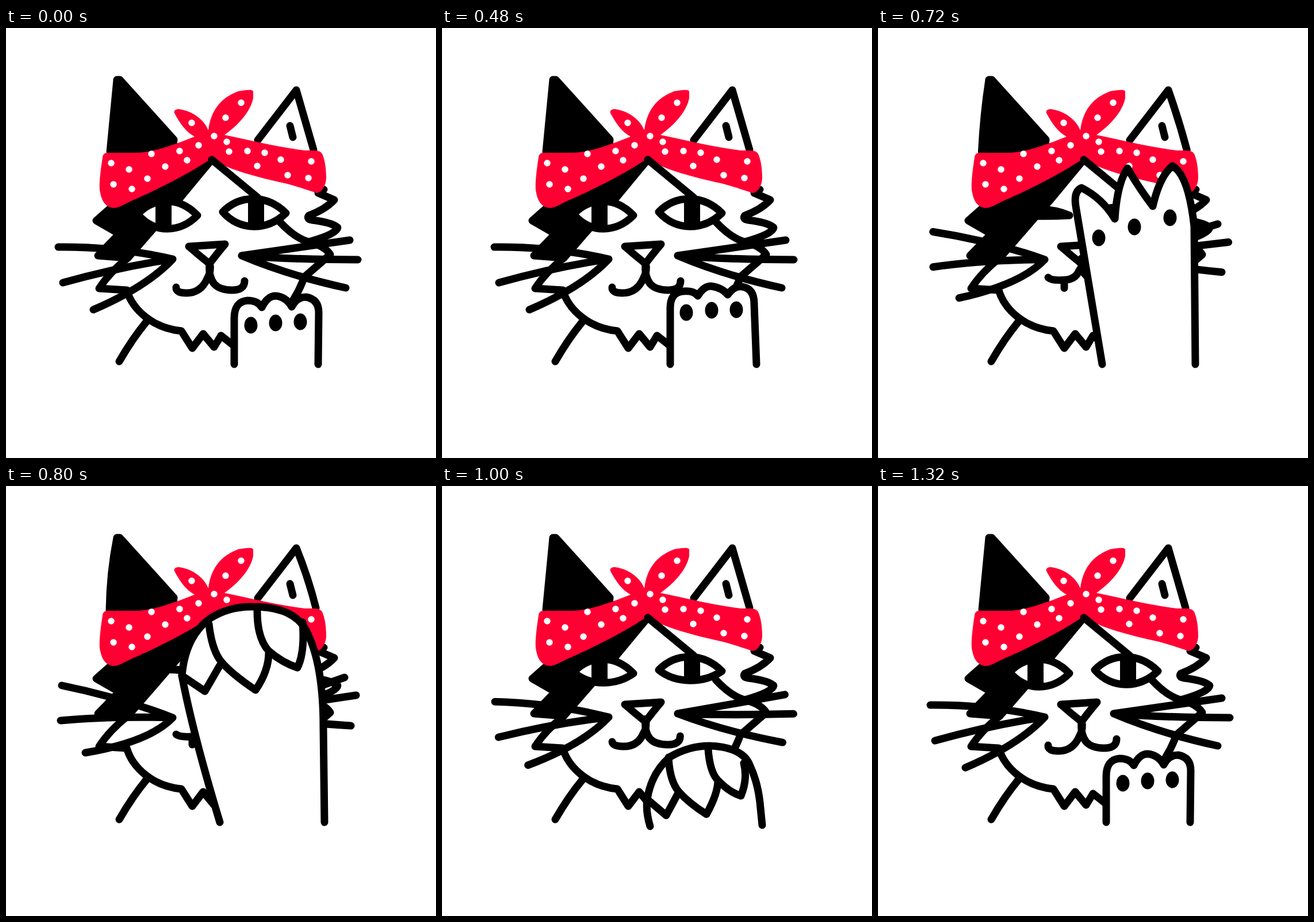
Recreate the animation shown at these times as an HTML page. Size 748x748 px, loop 1.4 s.

```html
<!DOCTYPE html>
<html lang="en">
<head>
<meta charset="utf-8">
<title>Cat washing its face</title>
<style>
html, body { margin: 0; width: 100%; height: 100%; overflow: hidden; background: #fff; }
svg { display: block; width: 100vw; height: 100vh; }
.ink { fill: none; stroke: #000; stroke-width: 13; stroke-linecap: round; stroke-linejoin: round; }
.solid { fill: #000; }
.paper { fill: #fff; }
.pupil { stroke: #000; stroke-width: 28; }
</style>
</head>
<body>
<svg viewBox="0 0 748 748">
  <path id="earL" class="ink solid"/>
  <path id="earR" class="ink"/>
  <path class="ink" d="M494 170L499 190"/>
  <path class="ink solid" d="M357 230L299 300L283 318L212 400L160 396L197 358L157 335L183 312Z"/>
  <g class="ink">
    <path d="M553 281h.01M543 287L571 299Q555 316 527 326Q522 332 532 334Q566 338 577 347Q576 358 527 372"/>
    <path d="M476 337Q505 368 530 373Q555 380 564 394Q540 415 519 433Q505 472 480 498Q450 514 415 527"/>
    <path d="M212 400Q180 425 162 453L210 456C220 490 255 522 305 527L324 557L343 532L362 555L374 535L398 554"/>
    <path d="M245 510Q220 540 197 580"/>
    <path d="M318 380L381 376Q365 395 354 410Q335 395 318 380"/>
  </g>
  <path id="whiskers" class="ink"/>
  <path id="mouth" class="ink"/>
  <path id="white" class="paper"/>
  <path id="pupils" class="pupil"/>
  <path id="lids" class="ink"/>
  <path fill="#ff0033" d="M176 217Q169 217 168 225C164 250 162 270 163 282C166 300 172 311 186 313C196 314 206 306 222 299C268 279 326 249 357 227C378 243 430 258 480 269C500 273 530 284 541 287C550 285 556 275 557 262C557 245 555 230 550 219C546 212 538 213 520 213C470 207 420 194 380 186C400 172 425 148 430 122L430 110C428 106 415 108 404 110C372 122 356 145 352 178C345 160 325 144 300 141Q291 142 293 148C302 165 312 180 328 189C300 200 255 218 222 217Z"/>
  <path id="dots" stroke="#fff" stroke-width="11.5" stroke-linecap="round"/>
  <path class="ink" d="M358 229L438 295"/>
  <path id="paw" class="ink paper"/>
  <path id="toes" class="ink"/>
  <g id="pads"><ellipse rx="11.5" ry="14.5"/><ellipse rx="11.5" ry="14.5"/><ellipse rx="11.5" ry="14.5"/></g>
</svg>
<script>
const LOOP = 1400;
const $ = id => document.getElementById(id);
const draw = (id, d) => $(id).setAttribute('d', d);
const lerp = (a, b, k) => a + (b - a) * k;

// Blend two paths that share the same commands
function mix(a, b, k) {
  const ends = b.match(/[\d.]+/g);
  let i = 0;
  return a.replace(/[\d.]+/g, v => lerp(+v, +ends[i++], k).toFixed(2));
}

const spots = '183 235,214 246,187 272,219 280,246 262,253 219,277 241,302 214,315 230,335 204,362 188,323 165,' +
  '382 156,409 130,384 198,388 215,420 214,450 217,437 240,478 229,490 256,526 261,531 232';
draw('dots', spots.split(',').map(p => `M${p}h.01`).join(''));

// Paw showing its pads
const palm = {
  low: {
    line: 'M397 585L397 505Q397 476 420 474Q438 474 445 486Q455 466 469 466Q488 468 497 485Q505 468 522 468Q544 472 544 495L543 585',
    pads: '426 517 469 513 512 511'
  },
  lift: {
    line: 'M397 585L397 490Q396 460 419 458Q438 456 445 466Q455 449 468 449Q488 452 497 464Q508 448 522 450Q543 453 543 480L547 585',
    pads: '425 495 469 491 512 490'
  },
  claws: {
    line: 'M406 585L376 360Q372 340 385 344Q412 358 432 393Q438 345 450 324Q468 355 491 383Q500 345 521 322Q545 335 550 405L550 585',
    pads: '409 416 464 407 520 396'
  },
  high: {
    line: 'M390 585L344 310Q340 284 354 278Q390 296 412 332Q416 270 434 244Q455 280 478 310Q490 258 512 240Q540 255 550 345L552 585',
    pads: '384 365 446 346 508 330'
  },
  dip: {
    line: 'M406 641L397 580Q398 540 418 531Q438 526 450 547Q462 528 478 528Q495 528 511 546Q518 546 535 538Q546 555 547 575L551 627',
    pads: '425 575 472 572 515 568'
  }
};

// Paw bent forward, toes hanging
const bent = {
  over: {
    line: 'M372 585Q325 430 306 330Q312 260 357 229Q390 209 430 210Q502 210 523 253Q552 310 552 420L554 585',
    toes: 'M306 330L346 357L372 312M353 240Q358 285 374 305Q390 325 434 355Q458 320 457 287M437 218Q437 265 457 287Q480 307 507 316Q520 290 516 237'
  },
  rest: {
    line: 'M362 592Q354 565 357 545Q364 499 397 471Q430 452 465 452Q524 454 536 487Q549 515 553 550L557 590',
    toes: 'M357 545L390 573L412 532M394 472Q396 513 412 532Q430 552 460 571Q480 535 480 512M463 458Q466 498 480 512Q500 533 520 539Q532 510 525 482'
  },
  sink: {
    line: 'M384 617Q372 590 376 566Q382 527 412 501Q440 483 472 482Q526 484 535 515Q546 540 550 572L554 609',
    toes: 'M376 569L406 574L426 550M408 503Q410 538 426 550Q442 566 468 577Q488 550 488 535M470 488Q474 522 488 535Q506 550 522 552Q534 530 528 510'
  }
};
const knuckles = 'M404 547L422 562L448 546M458 545L475 574L499 548M511 546L523 558L535 540M478 498Q506 494 517 535';

const blend = (set, a, b, k) => {
  const out = {};
  for (const key in set[a]) out[key] = mix(set[a][key], set[b][key], k);
  return out;
};

// start, whisker lift, mouth lift, upper lid, lower lid, paw
const steps = [
  [0, 0, 0, 23, 25, palm.low],
  [120, 0, 0, 23, 25, blend(palm, 'low', 'lift', .25)],
  [240, 0, 0, 23, 25, blend(palm, 'low', 'lift', .5)],
  [360, 0, 0, 23, 25, blend(palm, 'low', 'lift', .75)],
  [480, 0, 0, 23, 25, palm.lift],
  [560, .27, .38, 20, 18, blend(palm, 'lift', 'claws', .5)],
  [640, .54, .76, 14, 13, palm.claws],
  [720, .78, .9, 9, 3, palm.high],
  [800, 1, 1, 6, -5, bent.over],
  [920, .58, .65, 15, 8, blend(bent, 'over', 'rest', .5)],
  [1000, .17, .32, 23, 18, bent.rest],
  [1080, .07, .12, 23, 22, bent.sink],
  [1160, 0, 0, 23, 25, { line: palm.dip.line, toes: knuckles }],
  [1240, 0, 0, 23, 25, blend(palm, 'dip', 'low', .5)],
  [1320, 0, 0, 23, 25, palm.low]
];

const whiskers = [
  'M91 381Q195 380 290 402M99 443Q200 415 290 402M152 490Q245 450 290 402M598 369L410 396M612 403Q500 403 410 396M591 452Q490 430 410 396',
  'M97 347Q200 368 290 403M95 408Q180 400 290 403M138 464Q250 445 290 403M589 333L410 396M609 364Q500 380 410 396M600 417Q490 410 410 396'
];
const mouths = [
  'M354 408Q358 422 350 436Q339 461 314 461Q295 461 296 451M354 410Q352 432 362 445Q372 456 393 456Q415 456 415 440',
  'M354 400Q356 414 350 420Q344 436 322 436Q302 437 296 432M354 404Q352 420 362 429Q370 437 393 437Q413 437 413 424'
];
const ears = [
  ['M193 90L198 90L292 194L290 215L230 225L181 215Q187 152 193 90', 'M193 90L198 90L292 194L290 215L230 225L180 215Q181 150 193 90'],
  ['M438 195L505 108Q520 160 535 212', 'M438 195L505 108Q526 160 539 212']
];

// Almond with flattened lids
function eye(l, r, y, up, down) {
  const a = lerp(l, r, .27), b = lerp(l, r, .7);
  const top = y - up * 4 / 3, low = y + down * 4 / 3;
  return `M${l} ${y}C${a} ${top} ${b} ${top} ${r} ${y + 2}C${b} ${low} ${a} ${low} ${l} ${y}Z`;
}

function pose([, w, m, up, down, paw]) {
  const bow = Math.max(0, (w - .5) * 2);
  draw('earL', mix(...ears[0], bow));
  draw('earR', mix(...ears[1], bow));
  draw('whiskers', mix(...whiskers, w));
  const lip = lerp(461, 436, m);
  const fangs = m > .6 ? `M324 ${lip}V${lip + 14}M380 ${lip}V${lip + 12}` : '';
  draw('mouth', mix(...mouths, m) + fangs);

  const eyes = eye(229, 333, 324, up, down) + eye(377, 487, 320, up, down);
  draw('white', eyes);
  draw('lids', eyes);
  draw('pupils', down > 0 ? `M274 ${324 - up}V${324 + down}M435 ${321 - up}V${321 + down}` : '');

  draw('paw', paw.line);
  draw('toes', paw.toes || '');
  $('pads').style.display = paw.pads ? '' : 'none';
  if (paw.pads) {
    const p = paw.pads.split(' ');
    [...$('pads').children].forEach((pad, i) => {
      pad.setAttribute('cx', p[2 * i]);
      pad.setAttribute('cy', p[2 * i + 1]);
    });
  }
}

const start = performance.now();
let shown = null;
function tick() {
  const t = (performance.now() - start) % LOOP;
  const step = steps.filter(s => s[0] <= t).pop() || steps[0];
  if (step !== shown) pose(shown = step);
  requestAnimationFrame(tick);
}
tick();
</script>
</body>
</html>
```
